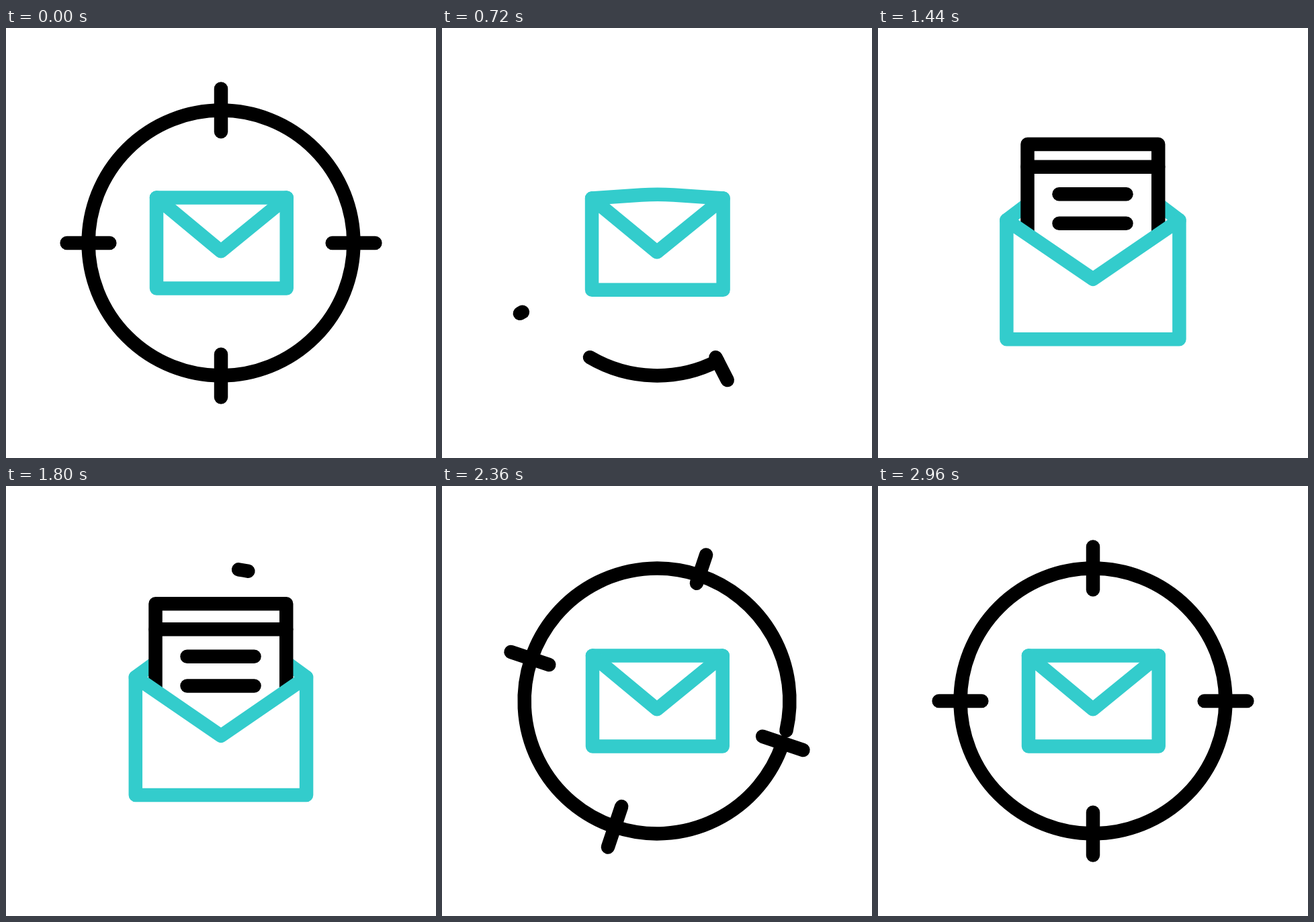
These frames come from a looping animation (640x640 px, 3 s). An HTML page with a canvas:

```html
<!DOCTYPE html>
<html lang="en">
<head>
<meta charset="utf-8">
<title>Mail target</title>
<style>
  html, body { margin: 0; width: 100%; height: 100%; overflow: hidden; background: #fff; }
  canvas { display: block; width: 100vmin; height: 100vmin; }
</style>
</head>
<body>
<canvas id="stage" width="640" height="640"></canvas>
<script>
const ctx = document.getElementById('stage').getContext('2d');
const LOOP = 3000, STEP = 40;
const TEAL = '#33cccc', BLACK = '#000';
const RAD = Math.PI / 180;

const clamp = x => Math.max(0, Math.min(1, x));
const smooth = x => x * x * (3 - 2 * x);
const ease = (t, start, length) => smooth(clamp((t - start) / length));

// Eased interpolation through [time, value] keys.
function track(t, keys) {
  for (let i = 1; i < keys.length; i++) {
    const [t0, v0] = keys[i - 1], [t1, v1] = keys[i];
    if (t < t1) return v0 + (v1 - v0) * ease(t, t0, t1 - t0);
  }
  return keys[keys.length - 1][1];
}

const SPIN = [[120, 90], [700, 153], [1720, 0], [2220, 110.5], [2960, 90]];
const OPEN = [[665, 0], [1205, 1.01], [1742, 1.01], [2205, 0]];
const FLAP = [[660, 0], [1035, 97], [1742, 97], [2205, 0]];
const SHEET = [[700, 345], [1174, 172], [1850, 175.2], [1910, 175.2], [2430, 350]];
const LINES = [[720, 385], [1160, 202], [1790, 213.2], [2440, 385]];

// Ticks start one after another, clockwise from the start of the ring.
const TICK_OUT = [518, 330, 240, 160];
const TICK_IN = [1804, 1882, 1964, 2064];
const TICK_TIME = 465;

function line(color, ...points) {
  ctx.strokeStyle = color;
  ctx.beginPath();
  points.forEach(([x, y]) => ctx.lineTo(x, y));
  ctx.stroke();
}

function ringAmount(t) {
  if (t < 1400) return 1 - ease(t, 160, 750);
  const x = clamp((t - 1765) / 680);
  return smooth(1 - Math.pow(1 - x, 1.25));
}

function tickAmount(t, i) {
  return t < 1400 ? 1 - ease(t, TICK_OUT[i], TICK_TIME) : ease(t, TICK_IN[i], TICK_TIME);
}

function drawTarget(t) {
  const outer = 229.4, inner = 165.7;
  ctx.save();
  ctx.translate(320, 320);
  ctx.rotate((track(t, SPIN) - 90) * RAD);
  const ring = ringAmount(t);
  if (ring > 0) {
    ctx.strokeStyle = BLACK;
    ctx.beginPath();
    ctx.arc(0, 0, 197.4, 0, ring * 2 * Math.PI);
    ctx.stroke();
  }
  for (let i = 0; i < 4; i++) {
    const amount = tickAmount(t, i);
    if (amount > 0) line(BLACK, [outer, 0], [outer - (outer - inner) * amount, 0]);
    ctx.rotate(Math.PI / 2);
  }
  ctx.restore();
}

function drawFlap(left, right, y, rise) {
  const mid = (left + right) / 2, bend = 24;
  const slope = rise / (mid - left);
  const shoulder = y - rise + slope * bend;
  ctx.strokeStyle = TEAL;
  ctx.beginPath();
  ctx.moveTo(left, y);
  ctx.lineTo(mid - bend, shoulder);
  ctx.quadraticCurveTo(mid, y - rise, mid + bend, shoulder);
  ctx.lineTo(right, y);
  ctx.stroke();
}

function drawSheet(t, left, right, y, tip, bottom) {
  const top = track(t, SHEET), head = track(t, LINES);
  const x0 = 222.5, x1 = 417.2;
  ctx.save();
  // Only the part above the pocket shows.
  ctx.beginPath();
  [[0, 0], [640, 0], [640, y], [right, y], [320, tip], [left, y], [0, y]]
    .forEach(([x, py]) => ctx.lineTo(x, py));
  ctx.clip();
  ctx.fillStyle = '#fff';
  ctx.fillRect(x0, top, x1 - x0, bottom - top);
  line(BLACK, [x0, bottom], [x0, top], [x1, top], [x1, bottom]);
  line(BLACK, [x0, head], [x1, head]);
  for (const drop of [40.5, 84.2]) line(BLACK, [269.5, head + drop], [369.5, head + drop]);
  ctx.restore();
}

function drawMail(t) {
  const open = track(t, OPEN);
  const left = 224 - 32.3 * open, right = 417.7 + 30.4 * open;
  const y = 252.6 + 33 * open;
  const tip = 332.3 + 41 * open;
  const bottom = 387.5 + 75 * open;
  drawFlap(left, right, y, track(t, FLAP));
  if (t > 720 && t < 2340) drawSheet(t, left, right, y, tip, bottom);
  line(TEAL, [left, y], [320, tip], [right, y], [right, bottom], [left, bottom], [left, y]);
}

function frame(now) {
  const t = Math.floor((now % LOOP) / STEP) * STEP;
  ctx.fillStyle = '#fff';
  ctx.fillRect(0, 0, 640, 640);
  ctx.lineWidth = 20.5;
  ctx.lineCap = ctx.lineJoin = 'round';
  drawTarget(t);
  drawMail(t);
}

let begin = null;
function tick(now) {
  if (begin === null) begin = now;
  frame(now - begin);
  requestAnimationFrame(tick);
}
frame(0);
requestAnimationFrame(tick);
</script>
</body>
</html>
```
